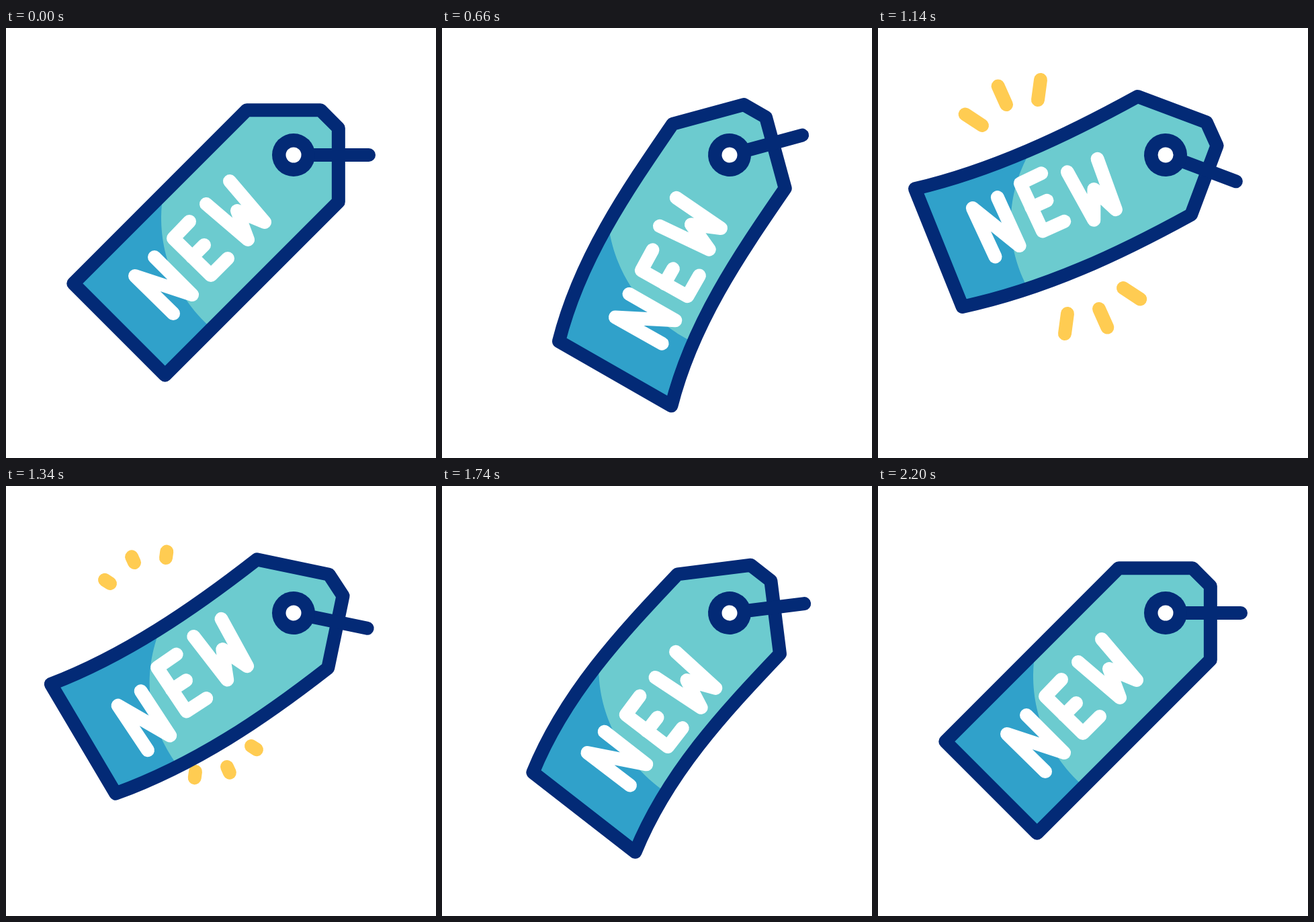
An HTML page with a canvas for the animation above (2400 ms loop, 640 px wide and 640 px high).

```html
<!DOCTYPE html>
<html lang="en">
<head>
<meta charset="utf-8">
<title>New tag</title>
<style>
html, body { margin: 0; width: 100%; height: 100%; overflow: hidden; background: #fff; }
canvas { display: block; width: 100vw; height: 100vh; object-fit: contain; }
</style>
</head>
<body>
<canvas id="stage" width="640" height="640"></canvas>
<script>
const ctx = document.getElementById('stage').getContext('2d');
const LOOP = 2400;
const NAVY = '#032a76', TEAL = '#6ccbcf', BLUE = '#30a1ca', YELLOW = '#ffcc52';
const PIVOT = [428, 189];
const TOP = 2, LEN = 365, HALF = 96.5;

// Eases between a few poses, each given as [time, ...values].
function ease(poses, t) {
  const i = poses.findIndex(p => p[0] > t);
  if (i === 0) return poses[0].slice(1);
  if (i < 0) return poses[poses.length - 1].slice(1);
  const from = poses[i - 1], to = poses[i];
  const u = (t - from[0]) / (to[0] - from[0]), k = u * u * (3 - 2 * u);
  return from.slice(1).map((v, n) => v + (to[n + 1] - v) * k);
}

// Angle of the head in degrees.
const SWING = [[220, 0], [700, -15.5], [1190, 21.6], [1590, -9.2], [2080, 0]];

// Sideways shift of upper handle, lower handle and foot, then slant of the foot.
const sag = [-10, -20, 13.8, 0], lift = [10, 12, -15, 1];
const BEND = [
  [220, 0, 0, 0, 0], [640, ...sag], [840, ...sag], [1180, ...lift],
  [1340, ...lift], [1740, -12, -23, 11.2, 0], [2160, 0, 0, 0, 0]
];

// One wave runs through the word, from its first letter to its last.
const WAVE = [[210, 0], [570, 12], [680, 12], [960, -12], [1050, -12], [1370, 12], [1500, 12], [1770, 0]];
const LAG = 172;
const WORD = [
  [[249, 425, 192, 369, 277, 397, 221, 341]],
  [[273, 288, 249, 313, 305, 368, 330, 343], [277, 341, 295, 323]],
  [[298, 262, 360, 315, 344, 272, 385, 289, 333, 228]]
];

// Inner end and direction of each ray, around the centre of the burst.
const BURST = [260, 266];
const RAYS = [[-105, -121, -26, -17], [-69, -152, -13, -29], [-22, -159, 4, -30]];

function line(pts) {
  ctx.beginPath();
  for (let i = 0; i < pts.length; i += 2) ctx.lineTo(pts[i], pts[i + 1]);
  ctx.stroke();
}

function disc(r, color) {
  ctx.fillStyle = color;
  ctx.beginPath();
  ctx.arc(0, 0, r, 0, 2 * Math.PI);
  ctx.fill();
}

function drawRays(t) {
  const u = (t - 1055) / 310;
  if (u <= 0 || u >= 1) return;
  const len = 39.5 * Math.sin(Math.PI * u);
  ctx.strokeStyle = YELLOW;
  for (const side of [1, -1]) {
    ctx.save();
    ctx.translate(...BURST);
    ctx.scale(side, side);
    for (const [x, y, dx, dy] of RAYS) {
      const k = len / Math.hypot(dx, dy);
      line([x, y, x + dx * k, y + dy * k]);
    }
    ctx.restore();
  }
}

// Drawn with x across the tag and y along it.
function drawBody(t) {
  const [a, b, c, slant] = ease(BEND, t);
  const h1 = TOP + LEN / 3, h2 = TOP + LEN * 2 / 3;
  const foot = TOP + LEN - 2.5 * slant;
  const half = HALF - 2 * slant, lean = 4.3 * slant;

  const body = new Path2D();
  body.moveTo(-HALF, TOP);
  body.lineTo(-19, -75.5);
  body.lineTo(19, -75.5);
  body.lineTo(HALF, TOP);
  body.bezierCurveTo(HALF + a, h1, HALF + b, h2, half + c, foot + lean);
  body.lineTo(c - half, foot - lean);
  body.bezierCurveTo(b - HALF, h2, a - HALF, h1, -HALF, TOP);
  body.closePath();

  ctx.fillStyle = TEAL;
  ctx.fill(body);

  // The shaded end has a round edge that follows the bend.
  ctx.save();
  ctx.clip(body);
  ctx.fillStyle = BLUE;
  ctx.beginPath();
  for (let w = -110; w <= 110; w += 5) {
    const s = 52.3 + Math.sqrt(217 ** 2 - (w - 80.6) ** 2);
    const u = (s - TOP) / LEN, v = 1 - u;
    ctx.lineTo(w + 3 * u * v * v * a + 3 * u * u * v * b + u ** 3 * c, s);
  }
  ctx.lineTo(160, 420);
  ctx.lineTo(-160, 420);
  ctx.fill();
  ctx.restore();

  ctx.strokeStyle = NAVY;
  ctx.stroke(body);
}

function drawWord(t) {
  ctx.strokeStyle = '#fff';
  WORD.forEach((strokes, i) => {
    const d = ease(WAVE, t - i * LAG)[0] * Math.SQRT1_2;
    ctx.save();
    ctx.translate(d - PIVOT[0], d - PIVOT[1]);
    strokes.forEach(line);
    ctx.restore();
  });
}

function draw(t) {
  ctx.fillStyle = '#fff';
  ctx.fillRect(0, 0, 640, 640);
  ctx.lineWidth = 20;
  ctx.lineCap = ctx.lineJoin = 'round';
  drawRays(t);

  ctx.save();
  ctx.translate(...PIVOT);
  ctx.rotate(ease(SWING, t)[0] * Math.PI / 180);
  ctx.save();
  ctx.rotate(Math.PI / 4);
  drawBody(t);
  ctx.restore();
  drawWord(t);
  ctx.strokeStyle = NAVY;
  line([22, 0, 112, 0]);
  disc(32, NAVY);
  disc(11.5, '#fff');
  ctx.restore();
}

const start = performance.now();
function tick() {
  draw((performance.now() - start) % LOOP);
  requestAnimationFrame(tick);
}
tick();
</script>
</body>
</html>
```
